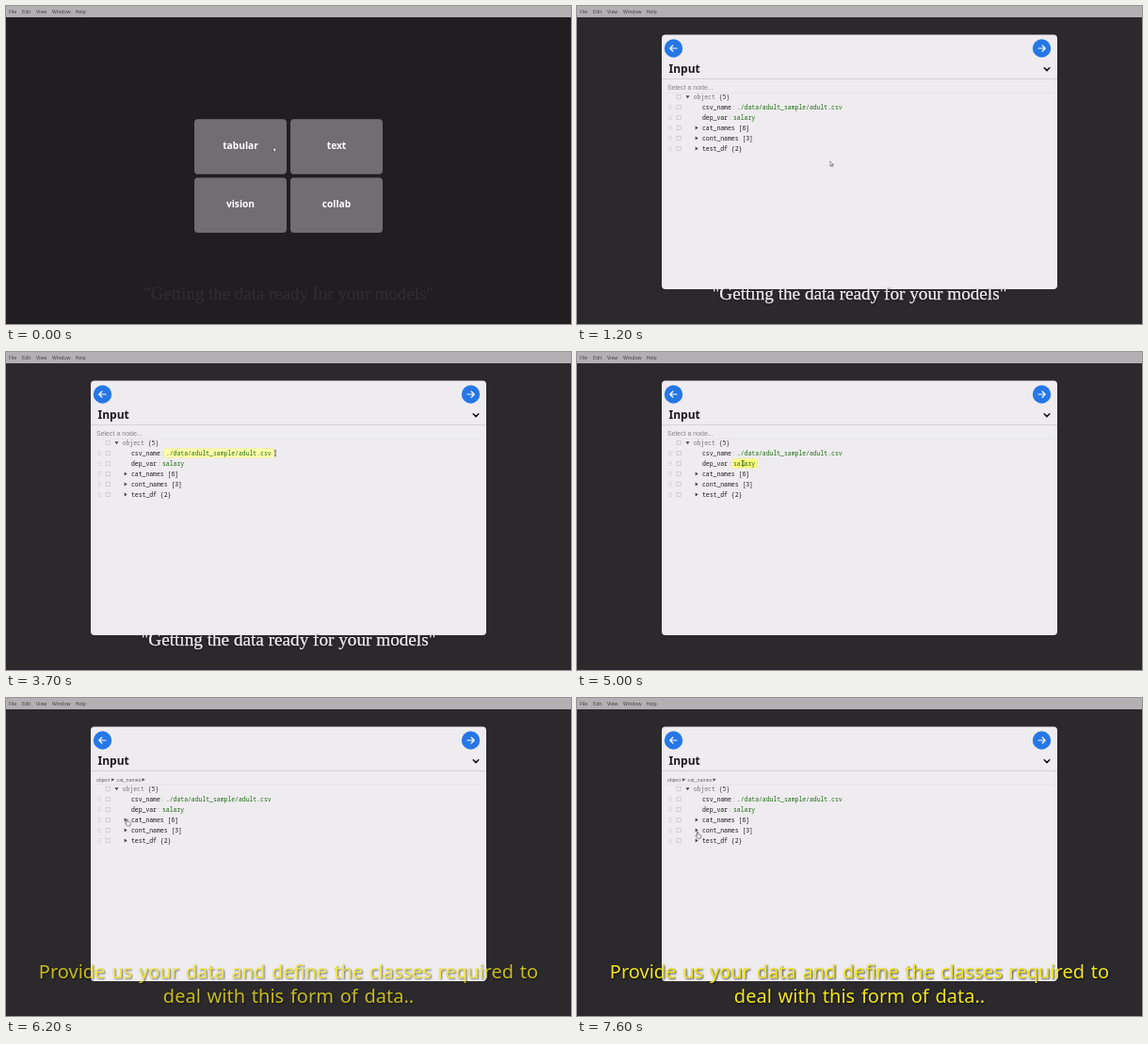
These frames come from a looping animation (600x338 px, 8000 ms). An HTML page:

```html
<!DOCTYPE html>
<html lang="en">
<head>
<meta charset="utf-8">
<title>Data input walkthrough</title>
<style>
html, body { margin: 0; width: 100%; height: 100%; overflow: hidden; background: #2b292b; }
svg { display: block; width: 100%; height: 100%; }
text { white-space: pre; }
.ui { font-family: "Noto Sans", "Open Sans", sans-serif; }
.mono { font: 6.43px "Noto Sans Mono", "DejaVu Sans Mono", monospace; fill: #1d1b1d; }
.value { fill: #1f6b12; }
.index { fill: #777; }
.faint { fill: #aaa; }
.quote { font: 19.2px "Liberation Serif", "Noto Serif", serif; fill: #fff; stroke: #fff; stroke-width: .25;
  text-anchor: middle; text-shadow: 0 1px 2px #0007; transform-origin: 300px 306px; }
.note { font: 20px "Noto Sans", "Open Sans", sans-serif; word-spacing: 1.6px; fill: #f3e51b;
  text-anchor: middle; text-shadow: 1px 1px 2px #000b; }

.anim { animation: 8s linear infinite; }
.cut { animation: 8s step-end infinite; }
#backdrop { animation-name: backdrop; }
#tiles { animation-name: tiles; }
#card { animation-name: card; }
#quote { animation-name: quote; }
#note { animation-name: note; }
#prompt { animation-name: prompt; }
#crumbs { animation-name: crumbs; }
#markPath { animation-name: markPath; }
#markSalary { animation-name: markSalary; }
#kids, #openTip { animation-name: open; }
#closedTip { animation-name: closed; }
#tail { animation-name: tail; }
#cursor { animation-name: travel; }
#arrow { animation-name: arrow; }
#beam { animation-name: beam; }
#hand { animation-name: hand; }

@keyframes backdrop { 0% { fill: #201e20 } 12.5%, 100% { fill: #2b292b } }
@keyframes tiles { 0% { opacity: 1 } 12.5%, 100% { opacity: 0 } }
@keyframes card { 0% { opacity: 0 } 15%, 100% { opacity: 1 } }
@keyframes quote {
  0% { opacity: .07; transform: scale(.984) }
  11.5%, 49% { opacity: 1; transform: none }
  61%, 100% { opacity: 0; transform: scale(.984) }
}
@keyframes note {
  0%, 67.5% { opacity: 0; transform: none }
  77.5% { opacity: .78; transform: none; animation-timing-function: ease-out }
  80% { opacity: 1; transform: translateY(-6.5px) }
  81.25% { transform: translateY(-8px) }
  83.5% { transform: translateY(-8px); animation-timing-function: ease-in-out }
  88.75%, 100% { opacity: 1; transform: none }
}
@keyframes prompt { 0% { opacity: 1 } 76.25%, 100% { opacity: 0 } }
@keyframes crumbs { 0% { opacity: 0 } 76.25%, 100% { opacity: 1 } }
@keyframes markPath { 0% { opacity: 0 } 33.75% { opacity: 1 } 56.25%, 100% { opacity: 0 } }
@keyframes markSalary { 0% { opacity: 0 } 57.5% { opacity: 1 } 65%, 100% { opacity: 0 } }
@keyframes open { 0% { opacity: 0 } 80% { opacity: 1 } 90%, 100% { opacity: 0 } }
@keyframes closed { 0% { opacity: 1 } 80% { opacity: 0 } 90%, 100% { opacity: 1 } }
@keyframes tail { 0% { transform: none } 80% { transform: translateY(55px) } 90%, 100% { transform: none } }
@keyframes travel {
  0% { transform: translate(284px, 150px) }
  10%, 22.5% { transform: translate(268.5px, 165px) }
  32.5% { transform: translate(280px, 117px) }
  37.5%, 53% { transform: translate(286px, 107.5px) }
  59%, 63.5% { transform: translate(176.5px, 118.5px) }
  66.25%, 91.25% { transform: translate(128.5px, 128.5px) }
  95%, 100% { transform: translate(128px, 142px) }
}
@keyframes arrow { 0% { opacity: 1 } 33.75% { opacity: 0 } 56.25% { opacity: 1 } 57.5%, 100% { opacity: 0 } }
@keyframes beam { 0% { opacity: 0 } 33.75% { opacity: 1 } 56.25% { opacity: 0 } 57.5% { opacity: 1 } 65%, 100% { opacity: 0 } }
@keyframes hand { 0% { opacity: 0 } 65%, 100% { opacity: 1 } }
</style>
</head>
<body>
<svg viewBox="0 0 600 338" preserveAspectRatio="none">
  <rect id="backdrop" class="cut" width="600" height="338"/>
  <g class="ui" font-size="5.2" fill="#454345">
    <rect width="600" height="12" fill="#b2b0b2"/>
    <text x="3" y="8">File</text><text x="17" y="8">Edit</text><text x="32" y="8">View</text>
    <text x="49" y="8">Window</text><text x="73.5" y="8">Help</text>
  </g>

  <g id="tiles" class="ui cut" font-size="10.2" font-weight="600" text-anchor="middle"></g>

  <g id="card" class="cut">
    <rect x="90" y="30.5" width="420" height="270.5" rx="4" fill="#eeecef"/>
    <g fill="none" stroke="#fff" stroke-width="1.2" stroke-linecap="round" stroke-linejoin="round">
      <circle cx="102.5" cy="45" r="9.7" fill="#2677e6" stroke="none"/>
      <path d="M106 45h-7m2.8-3-3 3 3 3"/>
      <circle cx="493.5" cy="45" r="9.7" fill="#2677e6" stroke="none"/>
      <path d="M490 45h7m-2.8-3 3 3-3 3"/>
      <path d="M496.2 65.8l2.8 2.8 2.8-2.8" stroke="#111" stroke-width="1.5"/>
    </g>
    <text class="ui" x="97.5" y="71.3" font-size="12" font-weight="600" fill="#1b191b">Input</text>
    <path d="M90 77.5h420" stroke="#cfcdd0" stroke-width=".8"/>
    <path d="M94 92.2h413" stroke="#e0dee1" stroke-width=".6"/>
    <g font-family="Liberation Sans, sans-serif" fill="#858385">
      <text id="prompt" class="cut" x="96" y="88.8" font-size="7">Select a node...</text>
      <g id="crumbs" class="cut" font-size="5.3" fill="#666">
        <text x="96" y="88.6">object</text><text x="117.5" y="88.6">cat_names</text>
        <path d="M112 85.2l3.4 1.6-3.4 1.6zM144.5 85.2l3.4 1.6-3.4 1.6z" fill="#555"/>
      </g>
    </g>
    <rect id="markPath" class="cut" x="168" y="102.8" width="116.5" height="9.4" rx="1.5" fill="#ffffab" stroke="#f4ef8c" stroke-width=".6"/>
    <rect id="markSalary" class="cut" x="165.2" y="113.6" width="26" height="9.6" rx="1.5" fill="#ffff82" stroke="#f4ef70" stroke-width=".6"/>
    <g id="tree" class="mono"></g>
  </g>

  <text id="quote" class="quote anim" x="300" y="312">"Getting the data ready for your models"</text>
  <g id="note" class="note anim">
    <text x="300" y="298">Provide us your data and define the classes required to</text>
    <text x="300" y="324">deal with this form of data..</text>
  </g>

  <g id="cursor" class="anim" stroke-linejoin="round">
    <path id="arrow" class="cut" d="M0 0v5l1.1-1 .9 1.9 1-.5-.9-1.8h1.6z" fill="#fff" stroke="#222" stroke-width=".5"/>
    <path id="beam" class="cut" d="M-1.2-2.8h2.4M0-2.8v5.6M-1.2 2.8h2.4" fill="none" stroke="#333" stroke-width=".7"/>
    <path id="hand" class="cut" d="M-.6.6q.6-.9 1.2 0v2.2l2.6.6q.8.3.6 1.2l-.5 2.6h-3.3l-2-2.8q.2-.9 1.4.2z" fill="#fff" stroke="#222" stroke-width=".55"/>
  </g>
</svg>
<script>
const byId = id => document.getElementById(id);
const rowY = row => 96.5 + row * 11;
const CHAR = 3.86;

const tile = (label, x, y) =>
  `<rect x="${x}" y="${y}" width="98" height="58.5" rx="4" fill="#706e71"/>
   <text x="${x + 49}" y="${y + 31.8}" fill="#fff">${label}</text>`;

byId('tiles').innerHTML = tile('tabular', 200, 120.3) + tile('text', 302, 120.3)
  + tile('vision', 200, 182.6) + tile('collab', 302, 182.6);

const label = (text, x, row, style = '') =>
  `<text x="${x}" y="${rowY(row) + 2.1}" class="${style}">${text}</text>`;

const grip = row => {
  const y = rowY(row);
  const dots = row ? `<path d="M98 ${y - 2.3}v5M100 ${y - 2.3}v5" stroke="#bbb" stroke-width=".8" stroke-dasharray=".9 1.1"/>` : '';
  return `${dots}<rect x="106" y="${y - 2}" width="4.2" height="4.2" fill="none" stroke="#c6c4c7" stroke-width=".7"/>`;
};

const tip = (x, row, open, attrs = '') =>
  `<path ${attrs} fill="#444" d="M${x} ${rowY(row)}${open ? 'm-2-1.3h4l-2 3z' : 'm-1.3-2v4l3-2z'}"/>`;

const pair = (key, value, x, row, style = '') => {
  const end = x + key.length * CHAR;
  return grip(row) + label(key, x, row, style) + label(':', end + .7, row, 'faint')
    + label(value, end + 6, row, 'value');
};

const branch = (key, size, row) => grip(row) + label(`${key} ${size}`, 133, row);

const categories = ['workclass', 'education', 'marital-status', 'occupation', 'relationship', 'race'];

// The sixth child row reuses the space below the list, so the tail moves by five rows plus one.
byId('tree').innerHTML = grip(0) + tip(117.5, 0, true)
  + label('object <tspan fill="#333">{5}</tspan>', 123.7, 0, 'index')
  + pair('csv_name', './data/adult_sample/adult.csv', 133, 1)
  + pair('dep_var', 'salary', 133, 2)
  + branch('cat_names', '[6]', 3)
  + tip(127, 3, false, 'id="closedTip" class="cut"') + tip(127, 3, true, 'id="openTip" class="cut"')
  + `<g id="kids" class="cut">${categories.map((name, i) => pair(String(i), name, 142, 4 + i, 'index')).join('')}</g>`
  + `<g id="tail" class="cut">${branch('cont_names', '[3]', 4)}${tip(127, 4, false)}`
  + `${branch('test_df', '{2}', 5)}${tip(127, 5, false)}</g>`;

// Six inserted rows push the remaining branches down.
document.styleSheets[0].insertRule(
  `@keyframes tail { 0% { transform: none } 80% { transform: translateY(${categories.length * 11}px) } 90%, 100% { transform: none } }`,
  document.styleSheets[0].cssRules.length);
</script>
</body>
</html>
```
